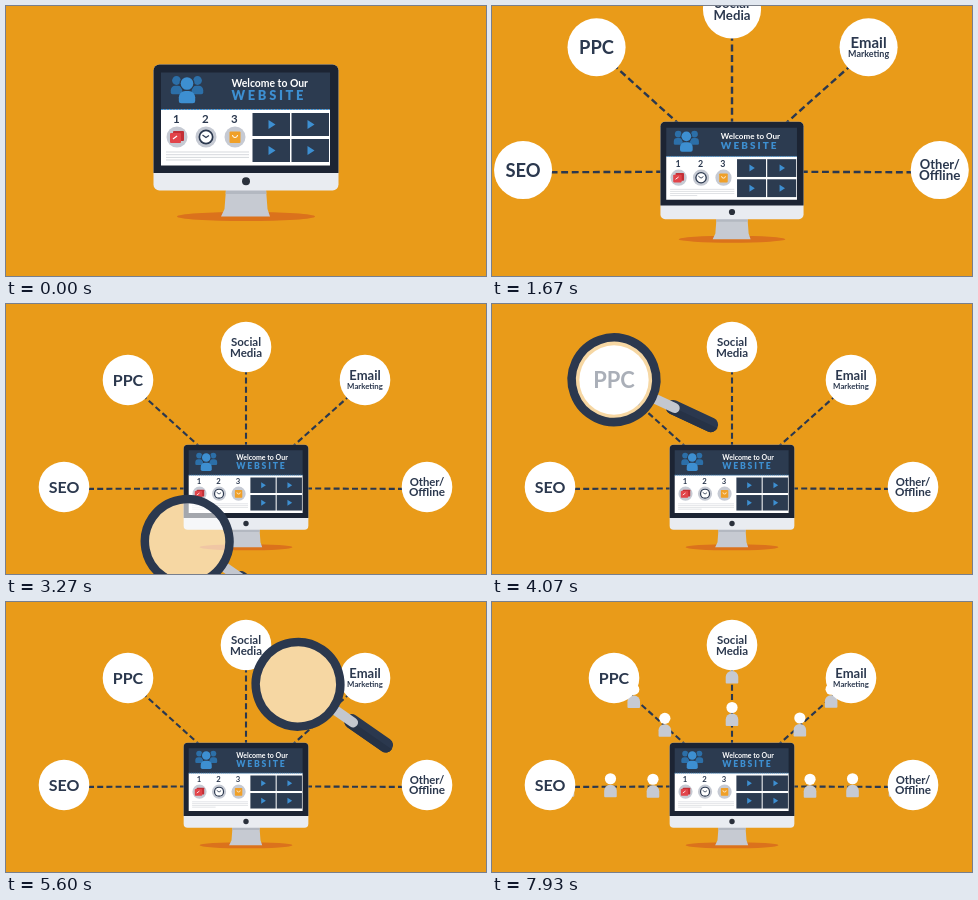
An HTML page with a canvas that plays this animation: 480 px wide and 270 px high, repeating every 8 s.

```html
<!DOCTYPE html>
<html lang="en">
<head>
<meta charset="utf-8">
<title>Website traffic channels</title>
<style>
  html, body { margin: 0; height: 100%; overflow: hidden; background: #e99b19; }
  canvas { display: block; width: 100vw; height: 100vh; }
</style>
</head>
<body>
<canvas id="stage"></canvas>
<script>
const W = 480, H = 270, LOOP = 8000;
const NAVY = '#2b384e', SLATE = '#2c3b50', BLUE = '#3d8fd1', WHITE = '#fff', GREY = '#c6cad3';
const FINAL_SCALE = 0.674, PIVOT = { x: 240, y: 311 };

const canvas = document.getElementById('stage');
const ctx = canvas.getContext('2d');
const dpr = window.devicePixelRatio || 1;
canvas.width = W * dpr;
canvas.height = H * dpr;

// Each label row: text, font size, baseline offset from the circle centre.
const channels = [
  { x: 58, y: 183, end: [180, 184.5], start: 6655, rows: [['SEO', 16, 6]] },
  { x: 122, y: 76, end: [195, 144], start: 7070, rows: [['PPC', 16, 6]] },
  { x: 240, y: 43, end: [240, 144], start: 7070, rows: [['Social', 11.5, -1.5], ['Media', 11.5, 9.5]] },
  { x: 359, y: 76, end: [285, 144], start: 7070, rows: [['Email', 13, 0.3], ['Marketing', 7.8, 8.7]] },
  { x: 421, y: 183, end: [300, 184.5], start: 6655, rows: [['Other/', 11.3, -1], ['Offline', 11.7, 9]] }
];

const mix = (a, b, p) => a + (b - a) * p;
const progress = (t, from, to) => Math.min(1, Math.max(0, (t - from) / (to - from)));
const ease = p => (1 - Math.cos(Math.PI * p)) / 2;

function rect(x, y, w, h, color, radius = 0) {
  ctx.fillStyle = color;
  ctx.beginPath();
  ctx.roundRect(x, y, w, h, radius);
  ctx.fill();
}

function disc(x, y, r, color, ry = r) {
  ctx.fillStyle = color;
  ctx.beginPath();
  ctx.ellipse(x, y, r, ry, 0, 0, Math.PI * 2);
  ctx.fill();
}

function polygon(color, ...points) {
  ctx.fillStyle = color;
  ctx.beginPath();
  points.forEach(([x, y]) => ctx.lineTo(x, y));
  ctx.fill();
}

function line(color, width, ...points) {
  ctx.strokeStyle = color;
  ctx.lineWidth = width;
  ctx.beginPath();
  points.forEach(([x, y]) => ctx.lineTo(x, y));
  ctx.stroke();
}

function text(str, x, y, size, color, { align = 'center', weight = 700, spacing = 0 } = {}) {
  ctx.font = `${weight} ${size}px Lato, sans-serif`;
  ctx.textAlign = align;
  ctx.letterSpacing = spacing + 'px';
  ctx.fillStyle = color;
  ctx.fillText(str, x, y);
}

function zoomAbout({ x, y }, scale) {
  ctx.translate(x, y);
  ctx.scale(scale, scale);
  ctx.translate(-x, -y);
}

function bust(x, y, r, color) {
  disc(x, y, r, color);
  rect(x - r * 1.3, y + r * 1.2, r * 2.6, r * 1.95, color, [r, r, r * 0.4, r * 0.4]);
}

function drawIcons() {
  [171, 200, 229].forEach((x, i) => {
    text(i + 1, x - 0.7, 116.5, 11.5, NAVY);
    disc(x, 131, 10.5, GREY);
  });
  rect(167, 125, 11, 10, '#c22f35', 1);
  rect(164, 127, 11, 10, '#e2444a', 1);
  line(WHITE, 1.2, [167, 133], [171, 130]);
  disc(200, 131, 7.5, NAVY);
  disc(200, 131, 5.8, WHITE);
  line(NAVY, 1.2, [196.5, 129], [200, 131.5], [203, 129.5]);
  rect(223.5, 125.5, 11, 11.5, '#f0a028', 1);
  ctx.strokeStyle = WHITE;
  ctx.lineWidth = 1;
  ctx.beginPath();
  ctx.arc(229, 129, 2.5, 0, Math.PI);
  ctx.stroke();
}

function drawMonitor() {
  disc(240, 210.5, 69, '#db721c', 4.6);
  polygon('#c6cad2', [220, 183], [260, 183], [261.5, 203], [264, 210.5], [215, 210.5], [218.5, 203]);
  polygon('#b3b8c1', [220, 183], [260, 183], [260.4, 188], [219.6, 188]);

  rect(147.5, 58.5, 185, 126, '#e9ecf1', 6);
  rect(147.5, 58.5, 185, 108.5, '#1c2433', [6, 6, 0, 0]);
  disc(240, 175.3, 4, '#2a303b');

  rect(155, 66.5, 169, 37, SLATE);
  rect(155, 103.5, 169, 56, WHITE);
  ctx.setLineDash([2, 1]);
  line(BLUE, 1, [155, 103.5], [324, 103.5]);
  ctx.setLineDash([]);

  bust(170.5, 74.5, 4.4, '#2c6fa8');
  bust(191.5, 74.5, 4.4, '#2c6fa8');
  disc(181, 77.5, 7.5, SLATE);
  bust(181, 77.5, 6.3, BLUE);
  text('Welcome to Our', 225.5, 81, 10.4, WHITE, { align: 'left' });
  text('WEBSITE', 225.5, 94, 12.8, BLUE, { align: 'left', weight: 900, spacing: 2.7 });

  drawIcons();
  [146, 148.7, 151.4, 154].forEach((y, i) =>
    line('#c3c7cd', 0.7, [160, y], [i < 3 ? 243 : 195, y]));

  for (const x of [246.5, 285.5]) {
    for (const y of [107, 133]) {
      rect(x, y, 37.5, 23, SLATE);
      polygon(BLUE, [x + 16, y + 7], [x + 23, y + 11.5], [x + 16, y + 16]);
    }
  }
}

function drawConnector({ x, y, end }, t) {
  const grown = ease(progress(t, 300, 1050));
  if (!grown) return;
  ctx.setLineDash([6, 3.2]);
  line(NAVY, 2.1, end, [mix(end[0], x, grown), mix(end[1], y + 2, grown)]);
  ctx.setLineDash([]);
}

function drawWalkers({ x, y, end, start }, t) {
  const length = Math.hypot(end[0] - x, end[1] - y);
  for (let d = (t - start) * 0.0807; d > 0; d -= 42.5) {
    if (d > length + 20) continue;
    const px = mix(x, end[0], d / length), py = mix(y, end[1], d / length);
    rect(px - 6.3, py - 1, 12.6, 12.5, GREY, [6, 6, 1, 1]);
    disc(px, py - 7, 5.6, WHITE);
  }
}

function drawChannel({ x, y, rows }, t, lens) {
  const near = Math.max(0, 1 - Math.hypot(lens.x - x, lens.y - y) / 40);
  const scale = ease(progress(t, 800, 1150)) * (1 + 0.37 * ease(near));
  if (!scale) return;
  ctx.save();
  ctx.translate(x, y);
  ctx.scale(scale, scale);
  disc(0, 0, 25.3, WHITE);
  rows.forEach(([str, size, dy]) => text(str, 0, dy, size, NAVY));
  ctx.restore();
}

function lensAt(t) {
  const enter = ease(progress(t, 2900, 3800));
  const cross = ease(progress(t, 4960, 5960));
  const turn = ease(progress(t, 5000, 6100));
  const leave = progress(t, 6650, 7250) ** 2;
  return {
    x: mix(215, 122, enter) + 238 * cross + 190 * leave,
    y: mix(330, 75.7, enter) + 0.5 * cross + 8 * Math.sin(Math.PI * cross) + 30 * leave,
    angle: mix(40, 25, enter) + 17 * turn
  };
}

function drawLens({ x, y, angle }) {
  ctx.save();
  ctx.translate(x, y);
  ctx.rotate(angle * Math.PI / 180);
  rect(58, -7.3, 56, 14.6, NAVY, 7);
  rect(58, 0, 56, 7.3, '#263246', [0, 0, 7, 7]);
  rect(44, -5, 28, 10, '#c3c7cf', [0, 5, 5, 0]);
  disc(0, 0, 39, 'rgba(255,255,255,.6)');
  ctx.strokeStyle = NAVY;
  ctx.lineWidth = 8.5;
  ctx.beginPath();
  ctx.arc(0, 0, 42.3, 0, Math.PI * 2);
  ctx.stroke();
  ctx.restore();
}

function draw(t) {
  ctx.setTransform(dpr, 0, 0, dpr, 0, 0);
  rect(0, 0, W, H, '#e99b19');

  const lens = lensAt(t);
  zoomAbout(PIVOT, mix(1 / FINAL_SCALE, 1, ease(progress(t, 420, 2415))));
  channels.forEach(c => drawConnector(c, t));
  channels.forEach(c => drawWalkers(c, t));
  channels.forEach(c => drawChannel(c, t, lens));

  ctx.save();
  zoomAbout(PIVOT, FINAL_SCALE);
  drawMonitor();
  ctx.restore();

  if (t > 2900 && t < 7250) drawLens(lens);
}

const begin = performance.now();
function tick() {
  draw((performance.now() - begin) % LOOP);
  requestAnimationFrame(tick);
}
tick();
</script>
</body>
</html>
```
